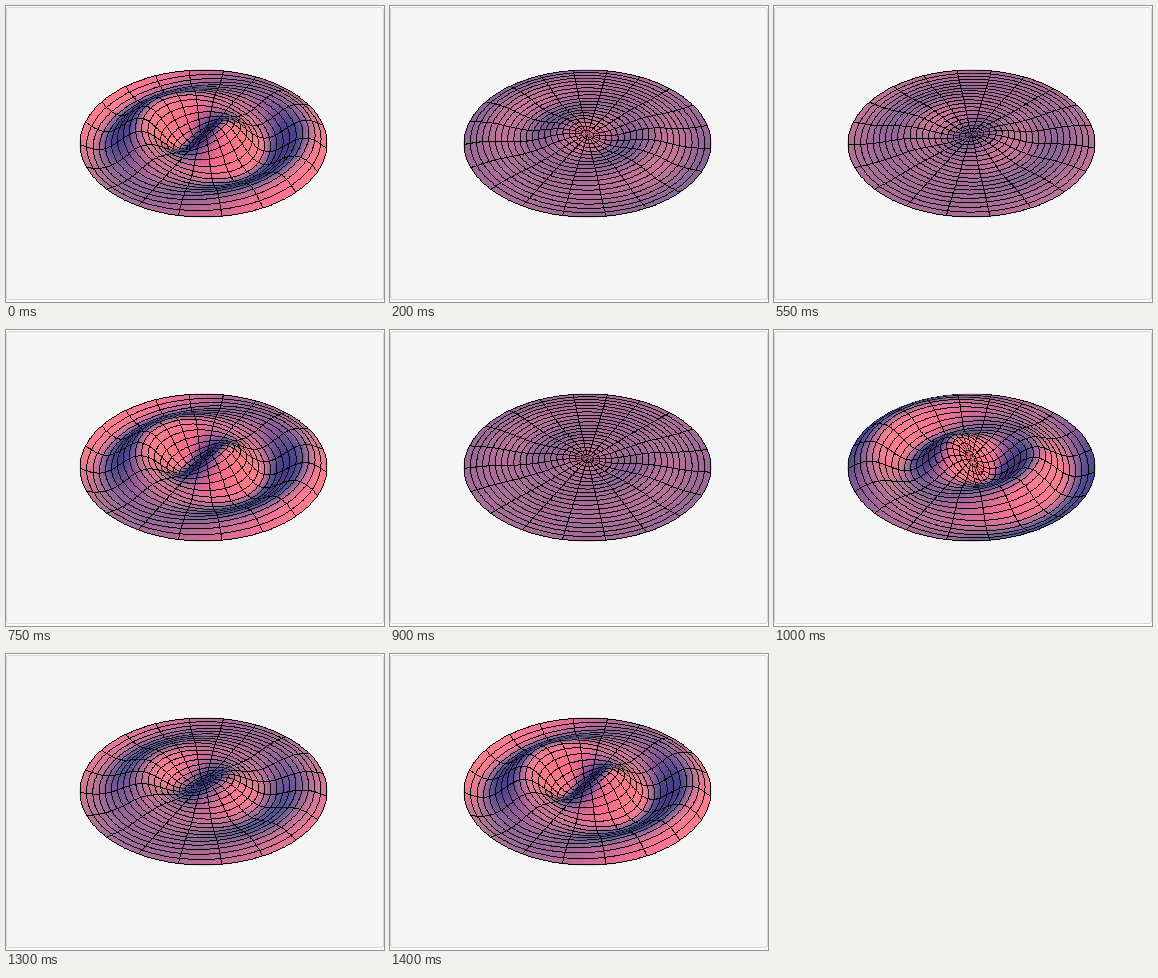
These frames come from a looping animation (378x296 px, 1.45 s). An HTML page with a canvas:

```html
<!DOCTYPE html>
<html lang="en">
<head>
<meta charset="utf-8">
<title>Vibrating drum</title>
<style>
html, body { margin: 0; width: 100%; height: 100%; overflow: hidden; background: #fff; }
.card {
  position: absolute; left: 0; top: 1px; width: 378px; height: 293px; box-sizing: border-box;
  background: #f5f5f5; border: 1px solid #d6d6d6; border-radius: 3px;
}
canvas { position: absolute; left: 0; top: 0; }
</style>
</head>
<body>
<div class="card"></div>
<canvas id="drum" width="378" height="296"></canvas>
<script>
const ctx = document.getElementById('drum').getContext('2d');

// 20 rings and 20 spokes of mesh lines over a finer, smoothly shaded surface.
const SUB_R = 3, SUB_A = 4;
const NR = 20 * SUB_R, NA = 20 * SUB_A;
const ZERO = 10.1735;            // third zero of J1
const HEIGHT = 0.3;
const STEP_MS = 50, STEPS = 29, STEP_PHASE = 0.442;
const CX = 197.5, CY = 128.75, SCALE = 122.6;

const dot = (a, b) => a[0] * b[0] + a[1] * b[1] + a[2] * b[2];
const sub = (a, b) => [a[0] - b[0], a[1] - b[1], a[2] - b[2]];
const cross = (a, b) => [
  a[1] * b[2] - a[2] * b[1],
  a[2] * b[0] - a[0] * b[2],
  a[0] * b[1] - a[1] * b[0]
];
const unit = a => {
  const len = Math.sqrt(dot(a, a));
  return a.map(v => v / len);
};

// Camera axes; the eye sits at twice (1.3, -2.4, 2) for a drum of radius 1.
const eye = [2.6, -4.8, 4];
const dist = Math.hypot(...eye);
const toEye = unit(eye);
const right = unit(cross([0, 0, 1], toEye));
const up = cross(toEye, right);

// One directional light per colour channel, in camera space.
const channels = [
  { dir: unit([1, 0, 1]), base: 0.28, gain: 0.88 },
  { dir: unit([1, 1, 1]), base: 0.13, gain: 0.35 },
  { dir: unit([0, 1, 1]), base: 0.32, gain: 0.27 }
];

function besselJ1(x) {
  const n = 64;
  let sum = 0;
  for (let i = 0; i < n; i++) {
    const a = (i + 0.5) * Math.PI / n;
    sum += Math.cos(a - x * Math.sin(a));
  }
  return sum / n;
}

const profile = Array.from({ length: NR + 1 }, (_, i) => HEIGHT * besselJ1(ZERO * i / NR));

function vertex(i, j, amp) {
  const r = i / NR, a = j * 2 * Math.PI / NA;
  const p = [r * Math.cos(a), r * Math.sin(a), amp * profile[i] * Math.cos(a)];
  const s = SCALE / (1 - dot(p, toEye) / dist);
  return { p, x: CX + s * dot(p, right), y: CY - s * dot(p, up) };
}

function shade(normal) {
  const n = [dot(normal, right), dot(normal, up), dot(normal, toEye)];
  const rgb = channels.map(c =>
    Math.round(255 * Math.min(1, c.base + c.gain * Math.max(0, dot(n, c.dir)))));
  return `rgb(${rgb})`;
}

function patches(amp) {
  const grid = Array.from({ length: NR + 1 }, (_, i) =>
    Array.from({ length: NA + 1 }, (_, j) => vertex(i, j, amp)));
  const list = [];
  for (let i = 0; i < NR; i++) {
    for (let j = 0; j < NA; j++) {
      const quad = [grid[i][j], grid[i + 1][j], grid[i + 1][j + 1], grid[i][j + 1]];
      const [a, b, c, d] = quad.map(v => v.p);
      const mid = [0, 1, 2].map(k => (a[k] + b[k] + c[k] + d[k]) / 4);
      const away = sub(eye, mid);
      list.push({ i, j, quad, color: shade(unit(cross(sub(c, a), sub(d, b)))), depth: dot(away, away) });
    }
  }
  return list.sort((a, b) => b.depth - a.depth);
}

// Crisp one-pixel line without smoothing.
function line(a, b) {
  const dx = b.x - a.x, dy = b.y - a.y;
  const n = Math.max(1, Math.ceil(Math.max(Math.abs(dx), Math.abs(dy))));
  for (let k = 0; k <= n; k++) {
    ctx.fillRect(Math.floor(a.x + dx * k / n), Math.floor(a.y + dy * k / n), 1, 1);
  }
}

function draw(step) {
  ctx.clearRect(0, 0, 378, 296);
  ctx.lineWidth = 0.6;
  for (const { i, j, quad, color } of patches(Math.cos(step * STEP_PHASE))) {
    const [a, b, c, d] = quad;
    ctx.beginPath();
    quad.forEach(v => ctx.lineTo(v.x, v.y));
    ctx.closePath();
    ctx.fillStyle = ctx.strokeStyle = color;
    ctx.fill();
    ctx.stroke();               // closes the seams between patches
    ctx.fillStyle = '#000';
    if (j % SUB_A === 0) line(a, b);
    if ((j + 1) % SUB_A === 0) line(d, c);
    if (i % SUB_R === 0) line(a, d);
    if ((i + 1) % SUB_R === 0) line(b, c);
  }
}

let shown = -1;
const start = performance.now();
function tick() {
  const step = Math.floor((performance.now() - start) / STEP_MS) % STEPS;
  if (step !== shown) draw(shown = step);
  requestAnimationFrame(tick);
}
tick();
</script>
</body>
</html>
```
